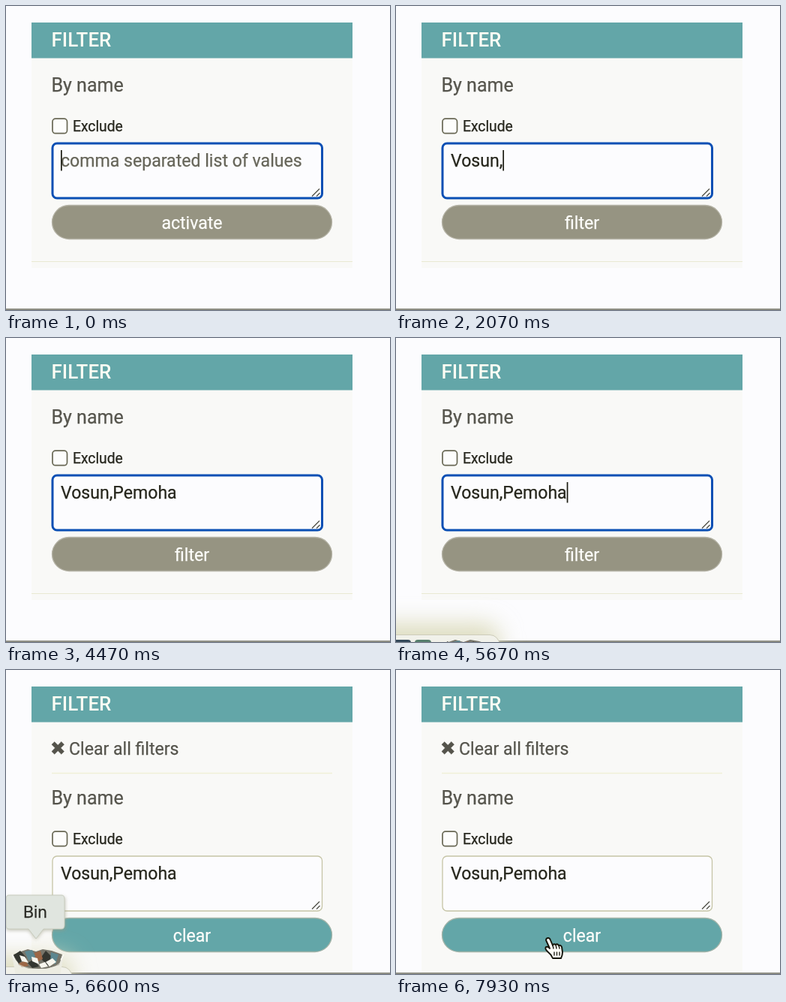
These frames come from a looping animation (512x405 px, 8000 ms). An HTML page:

```html
<!DOCTYPE html>
<html lang="en">
<head>
<meta charset="utf-8">
<title>Filter panel</title>
<style>
  html, body { margin: 0; width: 100%; height: 100%; overflow: hidden; background: #fcfcfe; }
  svg { display: block; width: 100%; height: 100%; }
  text {
    font: 23.1px Roboto, sans-serif;
    fill: currentColor; stroke: currentColor; stroke-width: .25px;
    white-space: pre;
  }
  .head { font-size: 26px; font-weight: 500; stroke: none; color: #fdfdf4; }
  .title { font-size: 25px; color: #56554d; }
  .small { font-size: 19.3px; color: #25251c; }
  .link { color: #55544c; }
  .typed { color: #26261c; }
  .hint { color: #666559; }
  .label { color: #fefefb; text-anchor: middle; }
  .cross { font: 25px "DejaVu Sans", sans-serif; color: #55544c; }
  .tip { font: 21.5px Inter, sans-serif; color: #2a2a24; text-anchor: middle; }
</style>
</head>
<body>
<svg viewBox="0 0 512 405">
  <defs>
    <filter id="blur" x="-60%" y="-150%" width="220%" height="400%"><feGaussianBlur stdDeviation="15"/></filter>
    <filter id="soft" x="-30%" y="-30%" width="160%" height="160%"><feGaussianBlur stdDeviation="2.5"/></filter>
  </defs>

  <rect id="panel" x="34" y="22" width="428" height="327" fill="#f9f9f7"/>
  <rect x="34" y="22" width="428" height="47.5" fill="#63a6a8"/>
  <text class="head" x="60.5" y="54">FILTER</text>

  <g id="clearAll">
    <text class="cross" x="58.7" y="113">✖</text>
    <text class="link" x="84" y="112.5">Clear all filters</text>
    <path d="M61 137.500H435" stroke="#f0f0d8" stroke-width="1.5"/>
  </g>

  <g id="form">
    <text class="title" x="60.5" y="114">By name</text>
    <rect x="62" y="150.2" width="19.5" height="19.5" rx="4" fill="#fdfdfc" stroke="#696855" stroke-width="1.7"/>
    <text class="small" x="89" y="167">Exclude</text>
    <rect id="box" x="62" y="183" width="359.5" height="73" rx="6" fill="#fcfcfe"/>
    <path d="M408 253.500L418 243.500M414 253.500L418.500 249" stroke="#505048" stroke-width="1.3"/>
    <text class="hint" id="hint" x="73" y="214">comma separated list of values</text>
    <text class="typed" id="typed" x="73" y="214"></text>
    <rect id="caret" y="192" width="1.7" height="27.5" fill="#1c1c12"/>
    <rect id="button" x="61.5" y="265.5" width="373" height="45" rx="22.5" stroke-width="1.3"/>
    <text class="label" id="label" x="248" y="296.5"></text>
    <path d="M34 340.500H462" stroke="#e9e9d2" stroke-width="1.2"/>
  </g>

  <path d="M0 404H512" stroke="#6d6c5c" stroke-width="1.6"/>

  <g id="dock">
    <rect id="glow" x="-80" y="380" height="60" rx="20" fill="#deddc0" filter="url(#blur)"/>
    <g id="shelf">
      <rect x="-200" y="395.5" width="338" height="50" rx="13" fill="#f1f1ea" stroke="#cdccba"/>
      <rect x="-8" y="402" width="28" height="20" rx="4" fill="#34495a"/>
      <rect x="25" y="402" width="22" height="20" rx="4" fill="#567e6c"/>
    </g>
    <g id="bin">
      <path d="M8 380L14 412H71L77 380z" fill="#efeee6"/>
      <path d="M10 379l10-4 9-3 11 3 9-3 12 2 14 5-4 14-17 5H30L14 392z" fill="#77756a"/>
      <path d="M10 380l9-6 8 9-10 8zM46 384l7-10 8 8-5 12zM29 390l9-5 6 10-9 2z" fill="#343630"/>
      <path d="M25 375l10-2 4 9-9 5zM60 376l10 3-4 13-7-4z" fill="#5c8790"/>
      <path d="M38 377l8-3 3 11-8 4zM17 391l9-4 4 7-9 2z" fill="#9c6746"/>
      <path d="M18 380l7 2 5 8-9-2zM34 382l8 2 2 8-9-4zM53 389l9-5 5 5-9 6zM44 392l8-3 4 6-9 2zM11 384l5 6 1 5-5-4z" fill="#f7f6ee"/>
      <path d="M8 380Q14 397 43 398T77 380L71 412H14z" fill="#ecebe0" opacity=".6"/>
      <path d="M8 379Q10 384 12 386M77 379Q75 384 73 386" fill="none" stroke="#fafaf2" stroke-width="1.5"/>
    </g>
    <g id="tip">
      <path d="M4 302H75Q79 302 79 306V343Q79 347 75 347H50L40 359 30 347H4Q0 347 0 343V306Q0 302 4 302z" fill="#9c9c84" opacity=".6" filter="url(#soft)"/>
      <path d="M4 300H74Q78 300 78 305V340Q78 345 74 345H50L40 358 30 345H4Q0 345 0 340V305Q0 300 4 300z" fill="#e0e5df" stroke="#c8ccbe"/>
      <text class="tip" x="39" y="330">Bin</text>
    </g>
  </g>

  <g id="pointer" stroke-linejoin="round" stroke-linecap="round">
    <path id="arrow" d="M0 0V21L5 16 9 25 13 23 9 15H16z" fill="#111" stroke="#fff" stroke-width="1.5"/>
    <g id="beam" fill="none">
      <use href="#beamLine" stroke="#fff" stroke-width="4.5"/>
      <use href="#beamLine" stroke="#17170c" stroke-width="1.9"/>
    </g>
    <g id="hand">
      <path d="M-5 2Q-5-1-2-1Q0-1 1 2L4 9Q5 6 8 8Q10 6 12 9Q15 8 16 11L17 18Q17 22 15 26H4Q2 21-3 17Q-7 13-5 11Q-2 10 0 13z" fill="#fdfdf8" stroke="#14140a" stroke-width="1.9"/>
      <path d="M4 9L5 13M8 8L9 13M12 9L13 13M6 18V22M9.500 18V22M13 18V22" fill="none" stroke="#14140a" stroke-width="1.3"/>
    </g>
  </g>
  <defs>
    <path id="beamLine" d="M-5-12Q0-12 0-8Q0-12 5-12M0-8V8M-5 12Q0 12 0 8Q0 12 5 12M-3 4H3"/>
  </defs>
</svg>
<script>
  const LOOP = 8000, APPLIED = 6000, SHIFT = 65;
  const WORDS = "Vosun,Pemoha";
  const KEY_TIMES = [560, 750, 930, 1200, 1450, 1800, 2300, 2550, 2800, 3000, 3300, 3600];
  const $ = id => document.getElementById(id);
  const set = (id, attrs) => {
    for (const name in attrs) $(id).setAttribute(name, attrs[name]);
  };
  const show = (id, on) => { $(id).style.display = on ? "" : "none"; };
  const write = (id, text) => { if ($(id).textContent !== text) $(id).textContent = text; };

  // Eased interpolation through [time, value] stops.
  function track(t, stops) {
    if (t <= stops[0][0]) return stops[0][1];
    for (let i = 1; i < stops.length; i++) {
      const [t0, a] = stops[i - 1], [t1, b] = stops[i];
      if (t <= t1) {
        const k = (t - t0) / (t1 - t0);
        return a + (b - a) * k * k * (3 - 2 * k);
      }
    }
    return stops[stops.length - 1][1];
  }

  function drawForm(t) {
    const applied = t >= APPLIED;
    const count = KEY_TIMES.filter(k => k <= t).length;
    const lastKey = count ? KEY_TIMES[count - 1] : 0;
    write("typed", WORDS.slice(0, count));
    write("label", applied ? "clear" : count ? "filter" : "activate");
    show("hint", !count);
    show("caret", !applied && (t - lastKey) % 1000 < 500);
    set("caret", { x: 73 + (count ? $("typed").getComputedTextLength() : 0) });
    set("form", { transform: `translate(0 ${applied ? SHIFT : 0})` });
    set("panel", { height: applied ? 381 : 327 });
    set("box", { stroke: applied ? "#c6c5a6" : "#0a4fb4", "stroke-width": applied ? 1.3 : 3 });
    set("button", { fill: applied ? "#63a6a8" : "#969482", stroke: applied ? "#a4b4a8" : "#b5b3a6" });
    show("clearAll", applied);
  }

  function drawDock(t) {
    const drop = track(t, [[5100, 70], [5600, 0], [6700, 0], [6930, 70]]);
    const right = track(t, [[5670, 138], [6250, 88]]);
    show("dock", t > 5100 && t < 6930);
    set("dock", { transform: `translate(0 ${drop})` });
    set("glow", { width: right + 80 });
    set("shelf", { transform: `translate(${right - 138} 0)` });
    set("bin", { transform: `translate(${right - 88} ${track(t, [[5670, 30], [6250, 0]])})` });
    show("tip", t >= 6250 && t < 6750);
  }

  function drawPointer(t) {
    const x = track(t, [[6930, 72], [7300, 156], [7500, 156], [7820, 205]]);
    const y = track(t, [[6930, 384], [7300, 285], [7500, 285], [7820, 358]]);
    const inside = (top, bottom) => x > 61 && y > top && y < bottom;
    const shape = inside(331, 376) ? "hand" : inside(247, 322) ? "beam" : "arrow";
    show("pointer", t >= 6930);
    set("pointer", { transform: `translate(${x} ${y})` });
    for (const id of ["arrow", "beam", "hand"]) show(id, id === shape);
  }

  const start = performance.now();
  function render() {
    const t = (performance.now() - start) % LOOP;
    drawForm(t);
    drawDock(t);
    drawPointer(t);
    requestAnimationFrame(render);
  }
  render();
</script>
</body>
</html>
```
